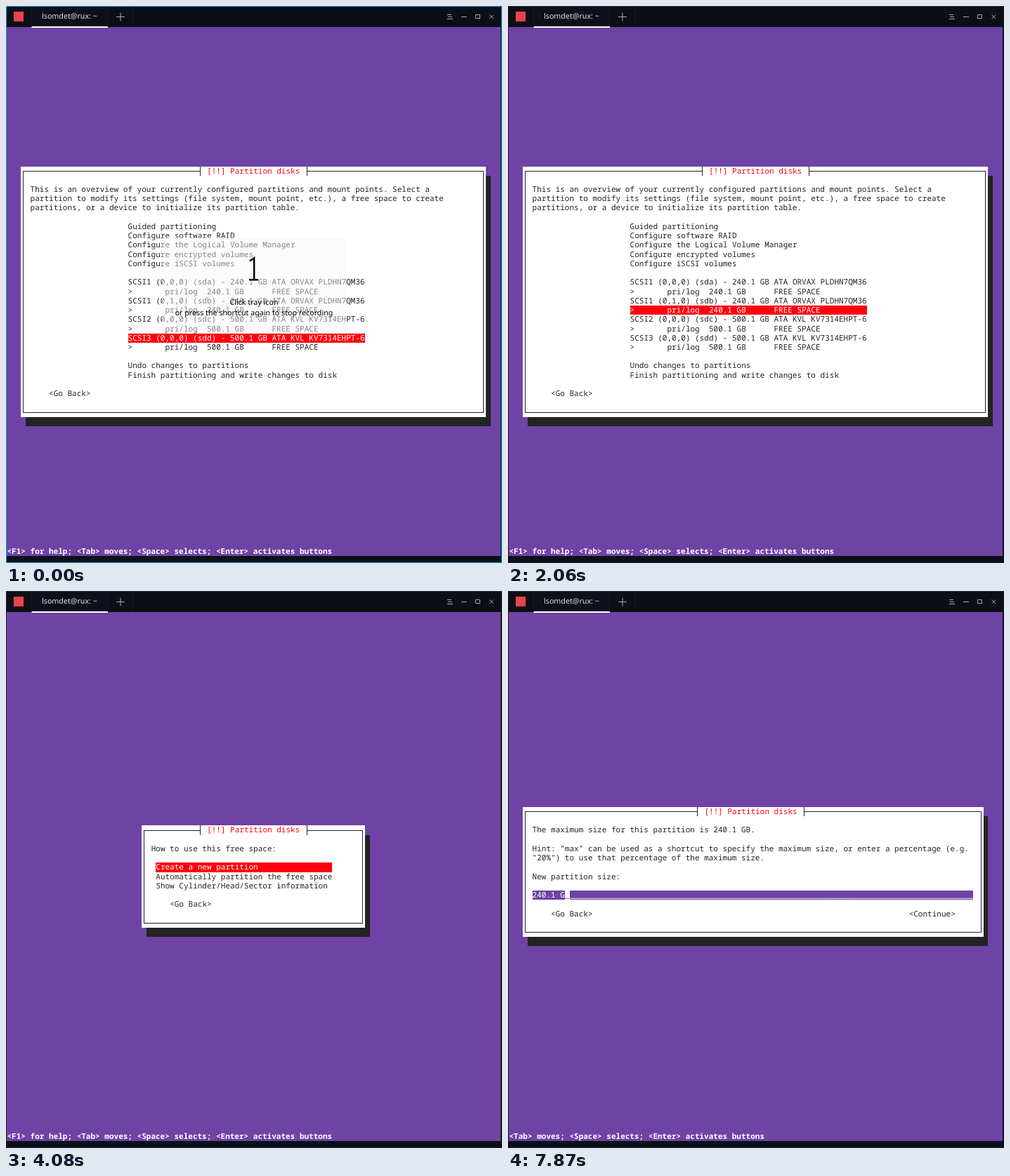
Write an HTML page that moves like this. It is 706x794 px and loops after 8 s.

```html
<!DOCTYPE html>
<html lang="en">
<head>
<meta charset="utf-8">
<title>Partition disks</title>
<style>
  html, body { margin: 0; width: 100%; height: 100%; overflow: hidden; background: #0e1019; }
  #stage {
    position: relative; width: 706px; height: 794px; overflow: hidden;
    background: #0e1019; text-rendering: geometricPrecision;
  }
  #stage div, #stage svg { position: absolute; }
  .scene { left: 0; top: 0; width: 706px; height: 794px; }
  .text {
    font: 11.03px/13.235px "Noto Sans Mono", monospace;
    height: 13.235px; white-space: pre; color: #232323;
  }
  .title { color: #ff000f; }
  .status { color: #fff; font-weight: bold; }
  .pick { color: #fff; background: #ff000f; }
  .field { color: #fff; background: #6e43a5; }
  .cursor { color: #6e43a5; background: #fffdfa; }
  .purple { background: #6e43a5; }
  .dark { background: #0e1019; }
  .shadow { background: #232323; }
  .paper { background: #fff; }
  .border { box-sizing: border-box; border: 1px solid #232323; }
  .gap { box-sizing: border-box; background: #fff; border: solid #232323; border-width: 0 1px; }
  .ui { font: 10.7px/16px "Noto Sans", sans-serif; white-space: pre; }
  .edge { box-sizing: border-box; inset: 0; border: 1px solid #1a1c22; border-top-color: #2b2e33; }
  .focus { box-sizing: border-box; inset: 0; border: 1px solid #05a5d8; }
  .bar { left: 0; top: 0; width: 706px; height: 30px; background: #0c0f16; }
  .tab { left: 36px; top: 1px; width: 109px; height: 28px; background: #0e1019; border-bottom: 2px solid #fff; }
  .rule { top: 1px; width: 1px; height: 29px; background: #171a21; }
  .badge { left: 11px; top: 8px; width: 14px; height: 14px; background: #e8434e; }
  .name { left: 51px; top: 7px; color: #dfe1e4; }
  .notice { left: 222px; top: 330px; width: 262px; height: 134px; border-radius: 3px; background: rgba(247, 247, 247, .46); }
  .tip { left: 153px; width: 400px; text-align: center; color: #000; }
</style>
</head>
<body>
<div id="stage">
  <div id="screen" class="scene"></div>
  <div class="bar">
    <div class="tab"></div>
    <div class="rule" style="left:36px"></div>
    <div class="rule" style="left:144px;height:28px"></div>
    <div class="rule" style="left:180px"></div>
    <div class="badge"></div>
    <div class="ui name">lsomdet@rux: ~</div>
    <svg width="706" height="30" fill="none" stroke="#a9abb0">
      <path d="M157 15.5h12M163 9.5v12"/>
      <path d="M628 12.5h6M629 15.5h6M628 18.5h8M648 15.5h8M668.5 12.5h6v5h-6zM688.5 12.5l5.5 5.5M694 12.5l-5.5 5.5"/>
    </svg>
  </div>
  <div class="edge"></div>
  <div id="recorder" class="scene">
    <div class="focus"></div>
    <div class="notice"></div>
    <svg width="706" height="794" fill="none" stroke="#000" stroke-width="2.4">
      <path d="M347 363.5l6.2-4.5v31.5M346 390.3h13"/>
    </svg>
    <div class="ui tip" style="top:415px">Click tray icon</div>
    <div class="ui tip" style="top:430px">or press the shortcut again to stop recording</div>
  </div>
</div>
<script>
const LOOP = 8000;
const screen_ = document.getElementById('screen');
const X = col => 1.5 + col * 6.618;
const Y = row => 30 + row * 13.235;

function add(parent, cls) {
  const el = document.createElement('div');
  el.className = cls;
  return parent.appendChild(el);
}

function rect(parent, cls, x1, y1, x2, y2) {
  const el = add(parent, cls);
  Object.assign(el.style, {
    left: x1 + 'px', top: y1 + 'px', width: x2 - x1 + 'px', height: y2 - y1 + 'px'
  });
  return el;
}

const cells = (parent, cls, c1, r1, c2, r2) =>
  rect(parent, cls, ...[X(c1), Y(r1), X(c2), Y(r2)].map(Math.round));

function text(parent, row, col, str, cls = '') {
  const el = add(parent, 'text ' + cls);
  el.style.left = X(col) + 'px';
  el.style.top = Y(row) + 'px';
  el.textContent = str;
  return el;
}

// Makes an element visible only within the given [from, to] times of each loop.
function show(el, ...spans) {
  const frames = [{ offset: 0, visibility: 'hidden', easing: 'step-end' }];
  for (const [from, to] of spans) {
    if (from === 0) frames.length = 0;
    frames.push({ offset: from / LOOP, visibility: 'visible', easing: 'step-end' });
    if (to < LOOP) frames.push({ offset: to / LOOP, visibility: 'hidden', easing: 'step-end' });
  }
  frames.push({ offset: 1, visibility: frames[frames.length - 1].visibility });
  el.animate(frames, { duration: LOOP, iterations: Infinity });
}

// Window with shadow, line border and a title set into the top line.
function dialog(c1, r1, c2, r2, titleCol) {
  const box = add(screen_, 'scene');
  const mid = n => n + 0.5;
  const px = c => Math.floor(X(mid(c)));
  const py = r => Math.floor(Y(mid(r)));
  cells(box, 'shadow', c1 + 1, r1 + 1, c2 + 1, r2 + 1);
  cells(box, 'paper', c1, r1, c2, r2);
  rect(box, 'border', px(c1), py(r1), px(c2 - 1) + 1, py(r2 - 1) + 1);
  rect(box, 'gap', px(titleCol - 2), Math.round(Y(r1)), px(titleCol + 21) + 1, Math.round(Y(r1 + 1)));
  text(box, r1, titleCol, '[!!] Partition disks', 'title');
  return box;
}

const lines = (box, row, col, list) => list.forEach((s, i) => s && text(box, row + i, col, s));

rect(screen_, 'purple', 1, 30, 704, 784);

const keys = '<Tab> moves; <Space> selects; <Enter> activates buttons';
show(text(screen_, 56, 0, '<F1> for help; ' + keys, 'status'), [0, 4030], [4080, 5430]);
show(text(screen_, 56, 0, keys, 'status'), [5430, LOOP]);

// Overview of the disks
const overview = dialog(3, 15, 103, 42, 43);
show(overview, [0, 4030]);
lines(overview, 17, 5, [
  'This is an overview of your currently configured partitions and mount points. Select a',
  'partition to modify its settings (file system, mount point, etc.), a free space to create',
  'partitions, or a device to initialize its partition table.'
]);
const small = ['240.1 GB', 'ORVAX PLDHN7QM36'];
const large = ['500.1 GB', 'KVL KV7314EHPT-6'];
const disks = [
  ['SCSI1 (0,0,0) (sda)', ...small],
  ['SCSI1 (0,1,0) (sdb)', ...small],
  ['SCSI2 (0,0,0) (sdc)', ...large],
  ['SCSI3 (0,0,0) (sdd)', ...large]
].flatMap(([id, size, model]) => [
  `${id} - ${size} ATA ${model}`,
  `>       pri/log  ${size}      FREE SPACE`.padEnd(51)
]);
lines(overview, 21, 26, [
  'Guided partitioning',
  'Configure software RAID',
  'Configure the Logical Volume Manager',
  'Configure encrypted volumes',
  'Configure iSCSI volumes',
  '',
  ...disks,
  '',
  'Undo changes to partitions',
  'Finish partitioning and write changes to disk'
]);
text(overview, 39, 9, '<Go Back>');

// The selection climbs one row at each of these times.
const climbs = [0, 1290, 1630, 2060, 2530, 2980, 4030];
climbs.slice(0, -1).forEach((from, i) => {
  const n = 6 - i;
  show(text(overview, 27 + n, 26, disks[n], 'pick'), [from, climbs[i + 1]]);
});

// Cleared screen
const blank = add(screen_, 'scene');
rect(blank, 'dark', 1, 771, 704, 784);
cells(blank, 'cursor', 0, 56, 1, 57);
show(blank, [4030, 4080]);

// Use of the free space
const usage = dialog(29, 23, 77, 34, 43);
show(usage, [4080, 5430]);
text(usage, 25, 31, 'How to use this free space:');
text(usage, 27, 32, 'Create a new partition'.padEnd(38), 'pick');
lines(usage, 28, 32, [
  'Automatically partition the free space',
  'Show Cylinder/Head/Sector information'
]);
text(usage, 31, 35, '<Go Back>');

// Size of the partition
const size = dialog(3, 21, 102, 35, 42);
show(size, [5430, LOOP]);
lines(size, 23, 5, [
  'The maximum size for this partition is 240.1 GB.',
  '',
  'Hint: "max" can be used as a shortcut to specify the maximum size, or enter a percentage (e.g.',
  '"20%") to use that percentage of the maximum size.',
  '',
  'New partition size:'
]);
text(size, 32, 9, '<Go Back>');
text(size, 32, 86, '<Continue>');

function input(value, span, ...blinks) {
  show(text(size, 30, 5, value.padEnd(95, '_'), 'field'), span);
  show(text(size, 30, 5 + value.length, '_', 'cursor'), ...blinks);
}
input('240.1 GB', [5430, 7870], [5430, 6030], [6580, 7180]);
input('240.1 G', [7870, LOOP], [7870, LOOP]);

show(document.getElementById('recorder'), [0, 50]);
</script>
</body>
</html>
```
